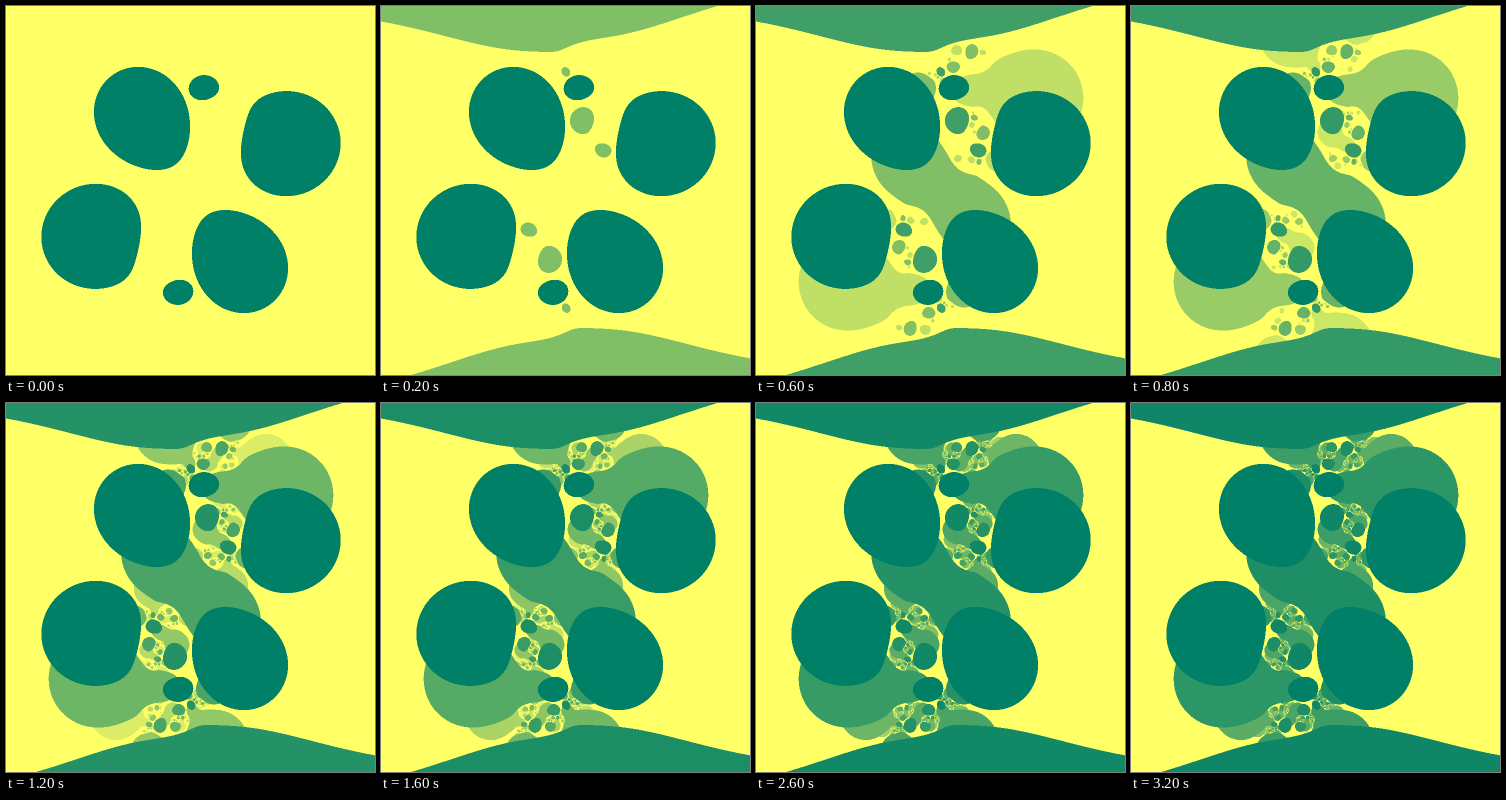
Write an HTML page with a canvas that moves like this. It is 369 px wide and 369 px high and loops after 3.4 s.

```html
<!DOCTYPE html>
<html lang="en">
<head>
<meta charset="utf-8">
<title>Julia set</title>
<style>
  html, body { margin: 0; width: 100%; height: 100%; overflow: hidden; background: #ff6; }
  canvas { display: block; width: 100vw; height: 100vh; }
</style>
</head>
<body>
<canvas id="stage" width="369" height="369"></canvas>
<script>
const SIZE = 369, SUB = 2, GRID = SIZE * SUB;
const UNIT = SIZE / 3.75;      // pixels per unit of the complex plane
const CENTER = { x: 185, y: 184 };
const STEPS = 17, STEP_MS = 200;
const RADIUS = 2;

// f(z) = (z^2 + b) / (z^2 + d)
const b = { re: 0.8, im: -0.9 };
const d = { re: 0.5, im: 0.5 };

// Iterations survived inside the radius; the first two escapes share level 0.
function level(x, y) {
  for (let i = 1; i < STEPS + 2; i++) {
    const re = x * x - y * y, im = 2 * x * y;
    const nr = re + b.re, ni = im + b.im;
    const dr = re + d.re, di = im + d.im;
    const q = dr * dr + di * di;
    x = (nr * dr + ni * di) / q;
    y = (ni * dr - nr * di) / q;
    if (!(x * x + y * y <= RADIUS * RADIUS)) return Math.max(0, i - 2);
  }
  return STEPS;
}

const levels = new Uint8Array(GRID * GRID);
const toUnit = (i, center) => ((i + 0.5) / SUB - center) / UNIT;
for (let j = 0; j < GRID; j++)
  for (let i = 0; i < GRID; i++)
    levels[j * GRID + i] = level(toUnit(i, CENTER.x), -toUnit(j, CENTER.y));

const ctx = document.getElementById("stage").getContext("2d");
const image = ctx.createImageData(SIZE, SIZE);

function draw(n) {
  const px = image.data;
  for (let y = 0, p = 0; y < SIZE; y++)
    for (let x = 0; x < SIZE; x++, p += 4) {
      let sum = 0;
      for (let j = 0; j < SUB; j++)
        for (let i = 0; i < SUB; i++)
          sum += Math.min(n, levels[(y * SUB + j) * GRID + x * SUB + i]);
      const v = sum / (n * SUB * SUB);
      // teal to yellow
      px[p] = 255 * v;
      px[p + 1] = 127.5 + 127.5 * v;
      px[p + 2] = 102;
      px[p + 3] = 255;
    }
  ctx.putImageData(image, 0, 0);
}

let shown = 0;
function tick() {
  const n = Math.floor(performance.now() / STEP_MS) % STEPS + 1;
  if (n !== shown) draw(shown = n);
  requestAnimationFrame(tick);
}
tick();
</script>
</body>
</html>
```
